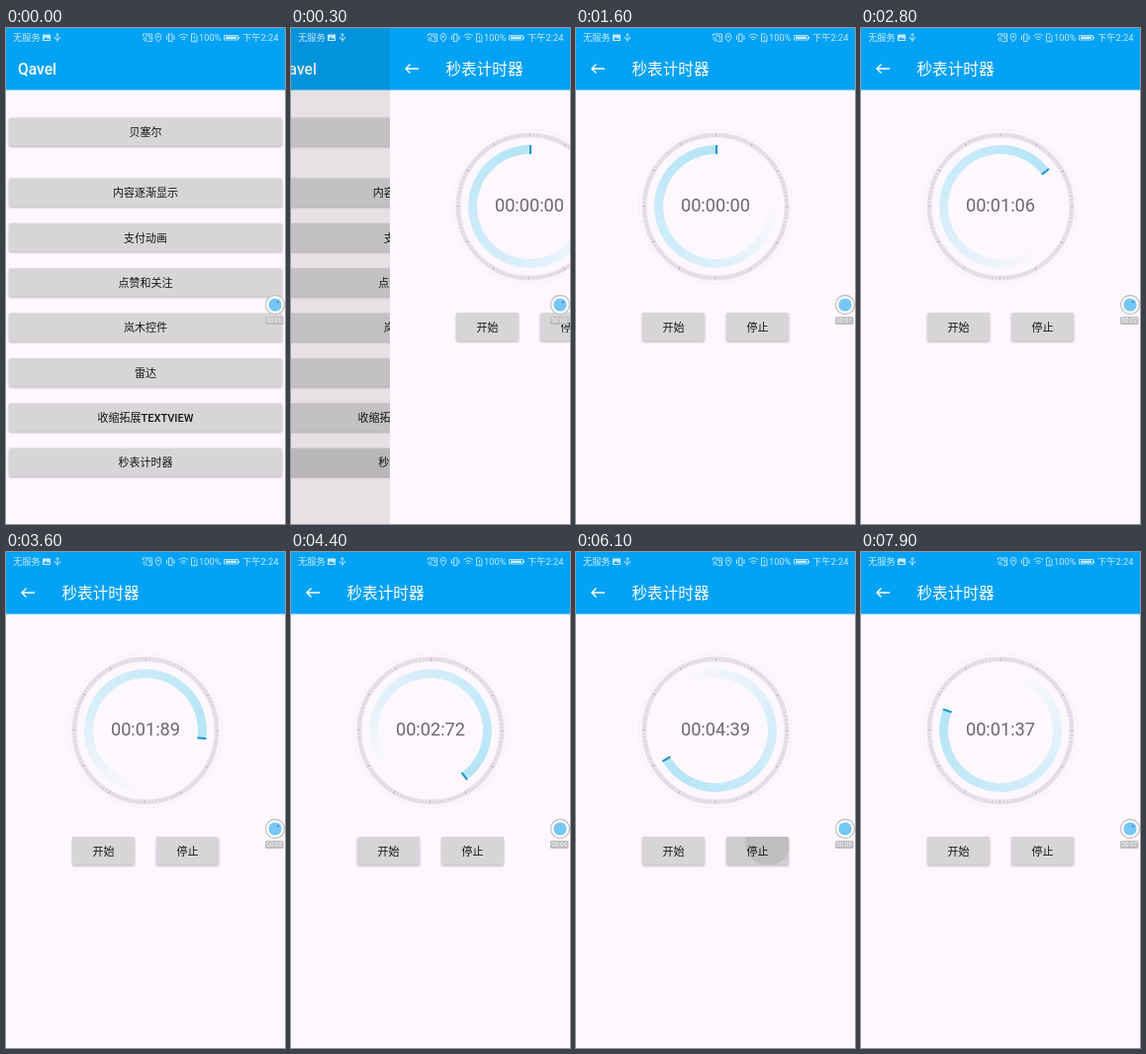
An HTML page that plays this animation: 282 by 500 pixels, repeating every 8000 ms.

```html
<!DOCTYPE html>
<html>
<head>
<meta charset="utf-8">
<style>
  html, body { margin: 0; width: 100%; height: 100%; overflow: hidden; background: #fdf8fd; }
  #stage { position: relative; width: 282px; height: 500px; overflow: hidden; }
  .page, #overlay { position: absolute; left: 0; top: 0; width: 282px; height: 500px; background: #fdf8fd; }
  #overlay { background: none; }
  svg { position: absolute; left: 0; top: 0; }
  text { font-family: Roboto, 'Noto Sans CJK SC', 'Noto Sans CJK', sans-serif; }
  .label { font-size: 11px; font-weight: 500; fill: #161416; text-anchor: middle; }
  .title { font-size: 15.6px; font-weight: 500; fill: #fff; }
  .status { font-size: 9.3px; fill: #fff; }
  .button { fill: #d8d5d8; filter: drop-shadow(0 1px .8px rgba(0, 0, 0, .28)); }
  #dim { position: absolute; inset: 0; background: #000; opacity: 0; }
  #arc {
    position: absolute; left: 79px; top: 118px; width: 124px; height: 124px; border-radius: 50%;
    background: conic-gradient(rgba(178, 228, 247, 0) 88deg, rgba(178, 228, 247, .5) 200deg, #b5e5f7 350deg);
    -webkit-mask: radial-gradient(circle, transparent 52.6px, #000 53.2px);
    mask: radial-gradient(circle, transparent 52.6px, #000 53.2px);
  }
</style>
</head>
<body>
<div id="stage">
  <div class="page" id="list">
    <svg width="282" height="500">
      <rect width="282" height="62.5" fill="#03a2f4"/>
      <text class="title" x="12" y="46.7">Qavel</text>
      <g id="rows"></g>
      <rect id="rowPress" x="3" y="424" width="276" height="29" rx="1.5" opacity="0"/>
    </svg>
    <div id="dim"></div>
  </div>

  <div class="page" id="watch">
    <svg width="282" height="500">
      <rect width="282" height="62.5" fill="#03a2f4"/>
      <path d="M29 41H16M20.5 36.5L16 41l4.5 4.5" fill="none" stroke="#fff" stroke-width="1.4"/>
      <text class="title" x="56.5" y="46.7">秒表计时器</text>
      <g fill="none">
        <circle cx="141" cy="180" r="77.5" stroke="#f8f3f8" stroke-width="1.5"/>
        <circle cx="141" cy="180" r="72" stroke="#e7e3e7" stroke-width="5"/>
        <circle cx="141" cy="180" r="72" stroke="#d2ced3" stroke-width="2.4" pathLength="120" stroke-dasharray=".25 .75"/>
        <circle cx="141" cy="180" r="72" stroke="#bdb9be" stroke-width="3" pathLength="120" stroke-dasharray=".3 9.7"/>
      </g>
      <g id="controls"></g>
      <clipPath id="startClip"><rect x="67" y="287" width="63" height="28.5" rx="1.5"/></clipPath>
      <clipPath id="stopClip"><rect x="152" y="287" width="63" height="28.5" rx="1.5"/></clipPath>
      <g id="startPress" clip-path="url(#startClip)" opacity="0">
        <rect x="67" y="287" width="63" height="29" opacity=".04"/>
        <circle cx="99" cy="301" r="0" opacity=".08"/>
      </g>
      <g id="stopPress" clip-path="url(#stopClip)" opacity="0">
        <rect x="152" y="287" width="63" height="29" opacity=".04"/>
        <circle cx="194" cy="293" r="0" opacity=".08"/>
      </g>
    </svg>
    <div id="arc"></div>
    <svg width="282" height="500">
      <rect id="hand" x="141" y="118" width="2" height="9.2" fill="#1695d2"/>
      <text id="time" x="141" y="185.4" font-size="18.2" fill="#6d686e" text-anchor="middle">00:00:00</text>
    </svg>
  </div>

  <svg id="overlay">
    <g opacity=".78">
      <text class="status" x="7" y="13">无服务</text>
      <text class="status" x="195" y="13">100%</text>
      <text class="status" x="239" y="13">下午2:24</text>
      <path d="M37 6.500h8v6.500h-8z" fill="#fff"/>
      <path d="M38 12l2-3 2 2 1-1 1.500 2z" fill="#03a2f4"/>
      <g fill="none" stroke="#fff" stroke-width=".9">
        <path d="M52 14V6M50.500 7.500L52 5.500l1.500 2M49.500 9v1.500l2.500 1.500 2.500-1.500V9"/>
        <path d="M138.500 8V6h9v7.500h-4M138.500 9.500a4 4 0 0 1 4 4M138.500 11.500a2 2 0 0 1 2 2M141 8h4.500v3.500"/>
        <path d="M154 14c-4-4-3.500-8.500 0-8.500s4 4.500 0 8.500z"/>
        <circle cx="154" cy="8.600" r=".8"/>
        <path d="M164.500 6h3.500v7.500h-3.500zM162.500 7.500v4.500M170 7.500v4.500"/>
        <path d="M174.500 8q4.800-4 9.500 0M176.200 10q3-2.500 6 0M177.800 11.800q1.500-1.200 3 0"/>
        <path d="M187.500 5.800h3.500l2 2v6h-5.500zM190.300 8v3M190.300 12v1"/>
        <path d="M220.500 7.500h14v4.500h-14zM235.500 8.800v2"/>
      </g>
      <rect x="222" y="8.500" width="11" height="2.500" fill="#fff"/>
    </g>
    <circle cx="272" cy="279" r="9.500" fill="#fff" stroke="#c5c2c6" stroke-width="1.300"/>
    <circle cx="272" cy="279" r="6.600" fill="#76c7f6"/>
    <circle id="dot" cx="274.800" cy="276.300" r="1.100" fill="#4d83b0"/>
    <rect x="262" y="291" width="18.500" height="8" rx="1.500" fill="#bfbcc0"/>
    <text id="clock" x="271.200" y="297.300" font-size="6.300" fill="#fff" text-anchor="middle">00:00</text>
  </svg>
</div>

<script>
const LOOP = 8000, STEP = 100;
const PAGE_X = [282, 282, 215, 100, 40, 14, 4];
const $ = id => document.getElementById(id);
const pad = n => String(n).padStart(2, '0');
const lerp = (t, t0, t1, a, b) => a + (b - a) * (t - t0) / (t1 - t0);

const button = (x, y, w, label) =>
  `<rect class="button" x="${x}" y="${y}" width="${w}" height="28.5" rx="1.5"/>
   <text class="label" x="${x + w / 2}" y="${y + 18.7}">${label}</text>`;

const labels = ['内容逐渐显示', '支付动画', '点赞和关注', '岚木控件', '雷达', '收缩拓展TEXTVIEW', '秒表计时器'];
$('rows').innerHTML = button(3, 90.5, 276, '贝塞尔') +
  labels.map((label, i) => button(3, 151.5 + i * 45.35, 276, label)).join('');
$('controls').innerHTML = button(67, 287, 63, '开始') + button(152, 287, 63, '停止');

function hundredths(t) {
  if (t < 1900) return 0;
  if (t >= 7400) return lerp(t, 7400, 7900, 87, 137);
  t = Math.min(t, 6100);
  return t < 4400 ? lerp(t, 2800, 4400, 106, 272) : lerp(t, 4400, 6100, 272, 439);
}

function handAngle(t) {
  if (t < 1900) return 0;
  if (t >= 7400) return lerp(t, 7400, 7900, 261, 289.4);
  return lerp(Math.min(t, 6100), 1900, 6100, 0, 239);
}

function press(id, t, from, to, startRadius, growth) {
  const group = $(id);
  group.setAttribute('opacity', t >= from && t < to ? 1 : 0);
  group.lastElementChild.setAttribute('r', startRadius + Math.min(t - from, 400) * growth);
}

function draw() {
  const t = Math.floor(performance.now() % LOOP / STEP) * STEP;

  const x = PAGE_X[t / STEP] ?? 0;
  const shown = 1 - x / 282;
  $('watch').style.transform = `translateX(${x}px)`;
  $('list').style.transform = `translateX(${-39 * shown}px)`;
  $('dim').style.opacity = .147 * shown;
  $('rowPress').setAttribute('opacity', t >= 100 ? .05 : 0);

  const n = Math.round(hundredths(t));
  $('time').textContent = `00:${pad(Math.floor(n / 100))}:${pad(n % 100)}`;
  const angle = handAngle(t);
  $('arc').style.transform = `rotate(${angle}deg)`;
  $('hand').setAttribute('transform', `rotate(${angle} 141 180)`);

  press('startPress', t, 1900, 2300, 14, .1);
  press('stopPress', t, 6000, 7400, 18, .05);

  $('clock').textContent = '00:' + pad(Math.floor(t / 1000));
  const dotShown = t < 1200 || (t >= 1900 && t < 3700) || t >= 7400;
  $('dot').setAttribute('opacity', dotShown ? 1 : 0);
  requestAnimationFrame(draw);
}
draw();
</script>
</body>
</html>
```
